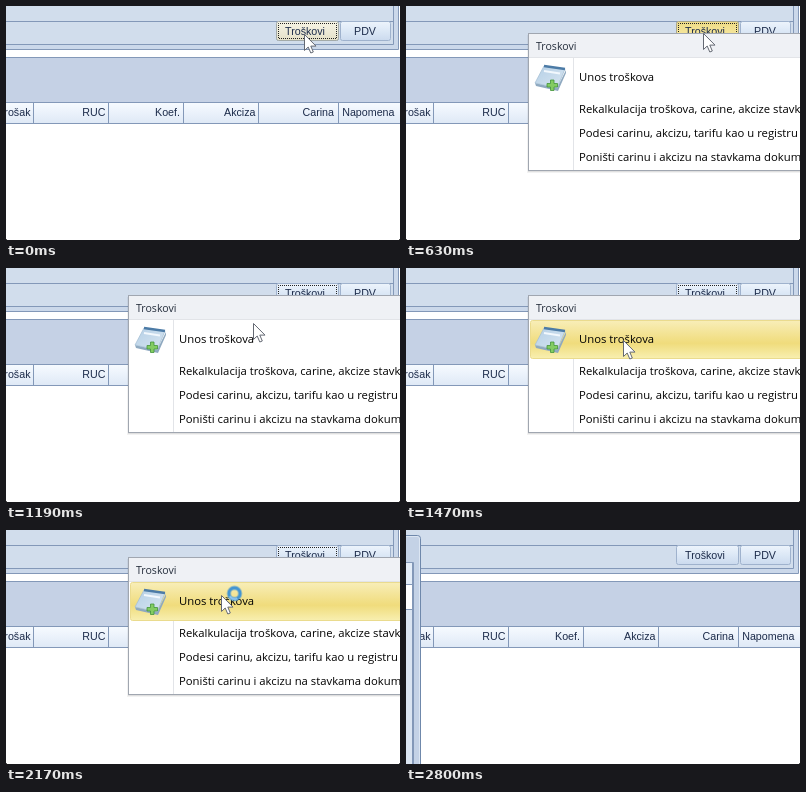
These frames come from a looping animation (394x234 px, 3640 ms). An HTML page:

```html
<!DOCTYPE html>
<html lang="hr">
<head>
<meta charset="utf-8">
<title>Troškovi</title>
<style>
html, body { margin: 0; width: 100%; height: 100%; overflow: hidden; background: #fff; }
svg { display: block; width: 394px; height: 234px; }
text { white-space: pre; }
.grid { font: 10.7px "Liberation Sans", Arial, sans-serif; fill: #1c2b4a; }
.end { text-anchor: end; }
.menu-text { font: 11.3px "Open Sans", "Noto Sans", sans-serif; fill: #000; }
.line { fill: none; stroke: #8398b8; }

/* One loop is 52 ticks of 70 ms; every change is a hard step. */
.warm, .hot, .focus, #menu, .glow, #cursor, #busy, .arc, #dialog, .content {
  animation: 3640ms step-end infinite;
}
.warm { animation-name: warm; }
.hot { animation-name: hot; }
.focus { animation-name: focus; }
#menu { animation-name: menu; }
.glow { animation-name: glow; }
#cursor { animation-name: move; }
#busy { animation-name: busy; }
.arc { animation-name: spin; }
#dialog { animation-name: dialog; }
.content { animation-name: content; }

@keyframes warm { 0% { opacity: 1 } 1.92%, 100% { opacity: 0 } }
@keyframes hot {
  0% { opacity: 0 } 1.92% { opacity: 1 } 19.23% { opacity: .7 }
  21.15% { opacity: .35 } 23.07%, 100% { opacity: 0 }
}
@keyframes focus { 0% { opacity: 1 } 67.3%, 100% { opacity: 0 } }
@keyframes menu {
  0% { opacity: 0 } 9.61% { opacity: .3 } 11.53% { opacity: .6 }
  13.46% { opacity: .85 } 15.38% { opacity: 1 } 63.46%, 100% { opacity: 0 }
}
@keyframes glow {
  0% { opacity: 0 } 34.61% { opacity: .3 } 36.53% { opacity: .65 }
  38.46%, 100% { opacity: 1 }
}
@keyframes move {
  0% { transform: translate(298px, 28px); opacity: 1 }
  9.61% { transform: translate(297px, 27px) }
  24.99% { transform: translate(292px, 28px) }
  26.92% { transform: translate(283px, 33px) }
  28.84% { transform: translate(272px, 40px) }
  30.76% { transform: translate(259px, 48px) }
  32.69% { transform: translate(247px, 55px) }
  34.61% { transform: translate(240px, 60px) }
  36.53% { transform: translate(235px, 64px) }
  38.46% { transform: translate(231px, 66px) }
  40.38% { transform: translate(217px, 72px) }
  42.3% { transform: translate(212px, 68px) }
  44.23% { transform: translate(215px, 65px) }
  63.46% { transform: translate(215px, 73px) }
  71.15% { transform: translate(219px, 91px) }
  73.07% { transform: translate(225px, 136px) }
  74.99% { transform: translate(231px, 209px); opacity: 1 }
  76.92%, 100% { transform: translate(231px, 209px); opacity: 0 }
}
@keyframes busy { 0% { opacity: 0 } 53.84% { opacity: 1 } 63.46%, 100% { opacity: 0 } }
@keyframes spin {
  0% { transform: rotate(0deg) } 55.76% { transform: rotate(50deg) }
  57.69% { transform: rotate(100deg) } 59.61% { transform: rotate(150deg) }
  61.53%, 100% { transform: rotate(200deg) }
}
@keyframes dialog { 0% { opacity: 0 } 63.46% { opacity: .5 } 65.38%, 100% { opacity: 1 } }
@keyframes content { 0% { opacity: 0 } 67.3%, 100% { opacity: 1 } }
</style>
</head>
<body>
<svg viewBox="0 0 394 234">
  <defs>
    <linearGradient id="blue" x2="0" y2="1">
      <stop stop-color="#edf4fc"/><stop offset=".5" stop-color="#dce8f6"/><stop offset="1" stop-color="#cbdaee"/>
    </linearGradient>
    <linearGradient id="cream" x2="0" y2="1">
      <stop stop-color="#f7f5e6"/><stop offset="1" stop-color="#e4e0c8"/>
    </linearGradient>
    <linearGradient id="amber" x2="0" y2="1">
      <stop stop-color="#efdc86"/><stop offset="1" stop-color="#f7eaa6"/>
    </linearGradient>
    <linearGradient id="head" x2="0" y2="1">
      <stop stop-color="#f6faff"/><stop offset="1" stop-color="#dfe9f6"/>
    </linearGradient>
    <linearGradient id="gold" x2="0" y2="1">
      <stop stop-color="#f8eeb8"/><stop offset=".45" stop-color="#f2e08a"/>
      <stop offset=".6" stop-color="#f0dc7c"/><stop offset="1" stop-color="#f8efb0"/>
    </linearGradient>
    <linearGradient id="cover" x2="1" y2="1">
      <stop stop-color="#b4cfe6"/><stop offset="1" stop-color="#d9e6f1"/>
    </linearGradient>
  </defs>

  <rect width="394" height="234" fill="#fff"/>

  <!-- toolbar -->
  <rect width="392" height="43" fill="#cbd8ea"/>
  <rect width="387" height="38" fill="#d1ddec"/>
  <path class="line" d="M0 15.5H387M0 38.5H387.5V0M0 43.5H392.5V0"/>
  <rect x="270.5" y="15.5" width="62" height="19" rx="2" fill="url(#blue)" stroke="#9fb2cd"/>
  <rect class="warm" x="270.5" y="15.5" width="62" height="19" rx="2" fill="url(#cream)" stroke="#a3aaa8"/>
  <rect class="hot" x="270.5" y="15.5" width="62" height="19" rx="2" fill="url(#amber)" stroke="#a9a68c"/>
  <rect class="focus" x="272.5" y="17.5" width="58" height="15" fill="none" stroke="#222"
    stroke-dasharray="1" stroke-dashoffset=".5"/>
  <rect x="334.5" y="15.5" width="50" height="19" rx="2" fill="url(#blue)" stroke="#9fb2cd"/>
  <g class="grid">
    <text x="279" y="28.5">Troškovi</text>
    <text x="348" y="28.5">PDV</text>
  </g>

  <!-- table -->
  <rect y="51" width="394" height="46" fill="#c5d1e5"/>
  <path class="line" d="M0 51.5H394"/>
  <rect y="97" width="394" height="20" fill="url(#head)"/>
  <path class="line" d="M0 96.5H394M0 117.5H394M27.5 97V117M102.5 97V117M177.5 97V117M252.5 97V117M332.5 97V117"/>
  <g class="grid">
    <text class="end" x="24.5" y="110">Trošak</text>
    <text class="end" x="99.5" y="110">RUC</text>
    <text class="end" x="174" y="110">Koef.</text>
    <text class="end" x="249.5" y="110">Akciza</text>
    <text class="end" x="328" y="110">Carina</text>
    <text class="end" x="388.5" y="110">Napomena</text>
  </g>
  <path d="M0 233h1v1h-1zM393 233h1v1h-1z" fill="#555"/>

  <!-- dialog edge -->
  <g id="dialog">
    <path d="M-1 5.5H11.5Q14.5 5.5 14.5 8.5V235H-1Z" fill="#c4d2e6" stroke="#6f88ab"/>
    <path d="M0 6.5H11Q13.5 6.5 13.5 9V234" fill="none" stroke="#dce6f3"/>
    <path d="M-1 32.5H7.5V235H-1Z" fill="#d3dfee" stroke="#8398b8"/>
    <g class="content">
      <rect y="33" width="7" height="201" fill="#fff"/>
      <rect y="33" width="7" height="21" fill="#e4edf8"/>
      <rect y="80" width="7" height="154" fill="#dbe5f2"/>
      <path class="line" d="M0 54.5H7M0 79.5H7M6.5 33V234"/>
    </g>
  </g>

  <!-- menu -->
  <g id="menu">
    <path d="M121 29H394V167H121Z" fill="#000" opacity=".05"/>
    <path d="M122 29H394V166H122Z" fill="#000" opacity=".08"/>
    <rect x="122.5" y="27.5" width="280" height="137" fill="#fff" stroke="#a0a6b0"/>
    <rect x="123" y="28" width="271" height="23" fill="#eff1f5"/>
    <path d="M123 51.5H394M167.5 52V164" stroke="#e2e4e8"/>
    <rect class="glow" x="124.5" y="52.5" width="280" height="38" rx="2" fill="url(#gold)" stroke="#eadb8e"/>
    <g stroke-linejoin="round">
      <path d="M129 77L151 82 160 64V67L152 85 130 80Z" fill="#8fa9c0"/>
      <path d="M138 60L159 63 151 82 129 77Z" fill="url(#cover)" stroke="#a3bdd3" stroke-width=".7"/>
      <path d="M138 60L159 63" stroke="#4c7ba6" stroke-width="2.4"/>
      <path d="M138 65L154 67.5" stroke="#f2f8fd" stroke-width="2"/>
      <path d="M144.5 74h3.5v3.5h3.5v3.5h-3.5v3.5h-3.5v-3.5h-3.5v-3.5h3.5z" fill="#83cc62" stroke="#43953a" stroke-width=".8"/>
    </g>
    <g class="menu-text">
      <text x="130" y="44" style="font-size:10.6px;fill:#252e3c">Troskovi</text>
      <text x="173" y="75">Unos troškova</text>
      <text x="173" y="107">Rekalkulacija troškova, carine, akcize stavkama</text>
      <text x="173" y="131">Podesi carinu, akcizu, tarifu kao u registru</text>
      <text x="173" y="155">Poništi carinu i akcizu na stavkama dokumenta</text>
    </g>
  </g>

  <!-- pointer -->
  <g id="cursor">
    <path d="M.5 .5V16.5L4.2 13 6.8 19 9.3 18 6.8 12.1H12Z" fill="#fff" stroke="#646973"/>
    <g id="busy">
      <g transform="translate(13.5 -1.5)" fill="none">
        <circle r="5.6" stroke="#4495d2" stroke-width="3.6"/>
        <path class="arc" d="M0 -5.6A5.6 5.6 0 0 1 5.6 0" stroke="#8cc4ee" stroke-width="2.4"/>
      </g>
    </g>
  </g>
</svg>
</body>
</html>
```
